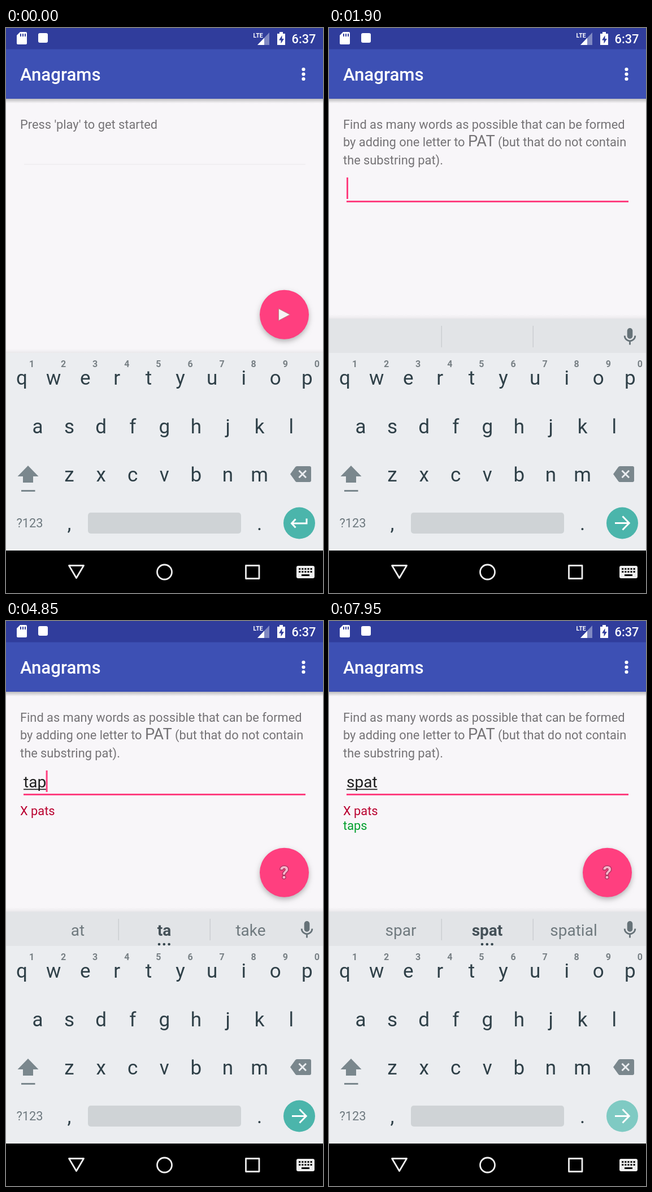
Write an HTML page with a canvas that moves like this. It is 561 by 998 pixels and loops after 8000 ms.

```html
<!DOCTYPE html>
<html lang="en">
<head>
<meta charset="utf-8">
<title>Anagrams</title>
<style>
  html, body { margin: 0; width: 100%; height: 100%; overflow: hidden; background: #f8f6f9; }
  canvas { display: block; }
</style>
</head>
<body>
<canvas id="stage" width="561" height="998"></canvas>
<script>
const ctx = document.getElementById('stage').getContext('2d');
const LOOP = 8000;
const PINK = '#ff3f7f', KEYBOARD = '#ebedf0', INK = '#2f4048', ICON = '#7a878d', WHITE = '#fff';

// Each timeline is a list of [start time, value]; the latest started entry holds.
const typed = [
  [0, ''], [2050, 'p'], [2150, 'pa'], [2250, 'pat'], [2300, 'pats'], [3250, ''],
  [4600, 't'], [4750, 'ta'], [4850, 'tap'], [5300, 'taps'], [5850, ''],
  [7000, 's'], [7100, 'sp'], [7200, 'spa'], [7300, 'spat']
];
const suggestions = [
  [0, ''], [2450, 'past pats path'], [3250, ''],
  [4700, 'to the this'], [4800, 'at ta take'], [4950, 'tape tap taps'],
  [5400, 'tape taps gaps'], [5850, ''], [7450, 'spar spat spatial']
];
const cursorOn = [
  [0, false], [850, true], [1350, false], [1900, true], [2950, false], [3250, true],
  [3750, false], [4250, true], [6350, false], [6850, true], [7950, false]
];
const enterPressed = [[0, false], [3100, true], [3250, false], [5700, true], [5850, false], [7950, true]];
const fabScale = [[0, 1], [1050, 0], [3450, .94], [3500, 1]];

const at = (timeline, t) => timeline.findLast(([start]) => t >= start)[1];

function rect(x, y, w, h, color, radius = 0) {
  ctx.fillStyle = color;
  ctx.beginPath();
  ctx.roundRect(x, y, w, h, radius);
  ctx.fill();
}

function circle(x, y, r, color) {
  ctx.fillStyle = color;
  ctx.beginPath();
  ctx.arc(x, y, r, 0, 7);
  ctx.fill();
}

function shape(path, color) {
  ctx.fillStyle = color;
  ctx.fill(new Path2D(path));
}

function line(path, color, width, cap = 'butt') {
  ctx.strokeStyle = color;
  ctx.lineWidth = width;
  ctx.lineCap = cap;
  ctx.stroke(new Path2D(path));
}

// Returns the x where the text ends.
function text(str, x, y, size, color, weight = 400, align = 'left') {
  ctx.font = `${weight} ${size}px Roboto, sans-serif`;
  ctx.textAlign = align;
  ctx.fillStyle = color;
  ctx.fillText(str, x, y);
  return x + ctx.measureText(str).width;
}

function shade(y, h, from, to) {
  const g = ctx.createLinearGradient(0, y, 0, y + h);
  g.addColorStop(0, `rgba(0,0,0,${from})`);
  g.addColorStop(1, `rgba(0,0,0,${to})`);
  ctx.fillStyle = g;
  ctx.fillRect(0, y, 561, h);
}

function drawBars() {
  rect(0, 0, 561, 38, '#303d9c');
  rect(0, 37.5, 561, 87.5, '#3d50b4');
  shade(125, 8, .24, 0);
  text('Anagrams', 25, 93, 31.2, WHITE, 500);
  for (const y of [73, 81.5, 90]) circle(526.5, y, 3.1, WHITE);

  shape('M25 7H35Q37 7 37 9V27Q37 29 35 29H21Q19 29 19 27V13Z', WHITE);
  for (const x of [25, 29, 33]) rect(x, 10, 2, 5, '#303d9c');
  rect(57, 9, 17, 17, WHITE, 3);

  shape('M466 8V30H445Z', '#7f88c2');
  shape('M457 17.5V30H445Z', WHITE);
  rect(438, 6, 17, 12, '#303d9c');
  text('LTE', 437.5, 17, 10.5, WHITE, 700);
  shape('M484 7H490V10H494V30H480V10H484Z', WHITE);
  shape('M488.5 13L483 21.5H486.5V27.5L492 19H488.5Z', '#303d9c');
  text('6:37', 505.5, 27, 21.8, WHITE, 500);
}

function drawPrompt(started) {
  const grey = '#757376';
  if (!started) {
    text("Press 'play' to get started", 25, 178, 21.8, grey);
    rect(32, 240, 498, 1.5, '#efedf0');
    return;
  }
  text('Find as many words as possible that can be formed', 25, 178, 21.8, grey);
  let x = text('by adding one letter to ', 25, 209, 21.8, grey);
  x = text('PAT', x, 209, 27.3, grey);
  text(' (but that do not contain', x, 209, 21.8, grey);
  text('the substring pat).', 25, 241, 21.8, grey);
}

function drawField(t) {
  const word = at(typed, t);
  const end = text(word, 31, 294, 28, '#1f1f1f');
  const composing = t < 7000 || t >= 7450;
  if (word && composing) rect(31, 296.5, end - 31, 1.8, '#1f1f1f');
  rect(31, 305, 499, 3, PINK);
  if (at(cursorOn, t)) rect(Math.max(end - .5, 31), 264, 3, 38, PINK);
  if (t >= 3250) text('X pats', 25, 343, 21.8, '#b9002f');
  if (t >= 5850) text('taps', 25, 369, 21.8, '#009f2c');
}

function drawFab(t) {
  const scale = at(fabScale, t);
  if (!scale) return;
  ctx.save();
  ctx.translate(492.5, t < 1050 ? 506.3 : 444.3);
  ctx.scale(scale, scale);
  ctx.globalAlpha = scale < 1 ? .94 : 1;
  ctx.shadowColor = 'rgba(0,0,0,.28)';
  ctx.shadowBlur = 10;
  ctx.shadowOffsetY = 4;
  circle(0, 0, 43.5, PINK);
  ctx.shadowColor = 'transparent';
  if (t < 850) {
    shape('M-10 -10.5L10 0L-10 10.5Z', '#f7f3f4');
    line('M-10 -10.5L10 0L-10 10.5Z', '#b9837f', 1);
  } else {
    ctx.font = '700 31px Roboto, sans-serif';
    ctx.textAlign = 'center';
    ctx.lineJoin = 'round';
    ctx.lineWidth = 2.6;
    ctx.strokeStyle = '#a4305a';
    ctx.strokeText('?', 0, 11);
    text('?', 0, 11, 31, '#f6b4ca', 700, 'center');
  }
  ctx.restore();
}

function drawStrip(t) {
  shade(506, 8, 0, .06);
  rect(0, 513.5, 561, 61, '#e2e4e7');
  for (const x of [198.5, 360.5]) rect(x, 526, 1.5, 38, '#cbced2');

  rect(527.7, 530, 9.6, 19, '#667278', 4.8);
  line('M523.2 543.5A9.3 9.3 0 0 0 541.8 543.5M532.5 553V559.5', '#667278', 2.8);

  const words = at(suggestions, t);
  if (!words) return;
  const [left, middle, right] = words.split(' ');
  text(left, 127, 556, 28, '#707a7f', 400, 'center');
  text(middle, 280, 556, 28, '#455158', 700, 'center');
  text(right, 433, 556, 28, '#707a7f', 400, 'center');
  for (const x of [271, 279.8, 288.6]) circle(x, 571, 2.3, '#37474f');
}

function drawKeyboard(t) {
  const pitch = 56.1;
  rect(0, 574, 561, 349, KEYBOARD);
  const rows = [['qwertyuiop', 28], ['asdfghjkl', 56], ['zxcvbnm', 112]];
  rows.forEach(([letters, x], row) => {
    [...letters].forEach((key, i) =>
      text(key, x + i * pitch, 630 + row * 85.7, 35, INK, 400, 'center'));
  });
  [...'1234567890'].forEach((digit, i) =>
    text(digit, 45.5 + i * pitch, 599, 16, '#788085', 700, 'center'));

  shape('M39 773L57.5 792H48V803H30V792H20.5Z', ICON);
  rect(27, 816, 24.5, 3, ICON);
  shape('M503 788L512 775.5Q513 774 515 774H537Q540 774 540 777V799Q540 802 537 802H515Q513 802 512 800.5Z', ICON);
  line('M518.5 781.8L531 794.3M531 781.8L518.5 794.3', KEYBOARD, 3);

  text('?123', 42, 882, 21.8, '#6e797f', 400, 'center');
  text(',', 112, 887, 35, INK, 400, 'center');
  text('.', 448.5, 887, 35, INK, 400, 'center');
  rect(145, 856, 271, 37, '#cfd3d6', 5);

  circle(519, 874.5, 28, at(enterPressed, t) ? '#7fcac3' : '#4bb5ab');
  line(t < 1050
    ? 'M532 866.5V875H506M512.5 867.5L505.5 875L512.5 882.5'
    : 'M506 874.5H531M519.5 862.5L531.2 874.5L519.5 886.5', WHITE, 3);
}

function drawNavigation() {
  rect(0, 923, 561, 75, '#000');
  ctx.lineJoin = 'round';
  line('M111.5 949.5H137.5L124.5 971.5Z', '#eee', 2.8);
  line('M293.5 961A13 13 0 1 1 267.5 961A13 13 0 1 1 293.5 961Z', '#eee', 2.8);
  line('M424.5 949.5H448V972.5H424.5Z', '#eee', 2.8);
  ctx.lineJoin = 'miter';
  rect(514, 950, 32, 22, '#eee', 3);
  for (let i = 0; i < 5; i++)
    for (const y of [954, 959]) rect(518.2 + i * 5.1, y, 3, 3, '#000');
  rect(523, 965, 14, 3, '#000');
}

function draw(t) {
  const started = t >= 850;
  rect(0, 0, 561, 998, '#f8f6f9');
  drawBars();
  drawPrompt(started);
  if (started) drawField(t);
  drawFab(t);
  if (t >= 1050) drawStrip(t);
  else shade(567, 7, 0, .06);
  drawKeyboard(t);
  drawNavigation();
}

function tick() {
  draw(performance.now() % LOOP);
  requestAnimationFrame(tick);
}
tick();
</script>
</body>
</html>
```
